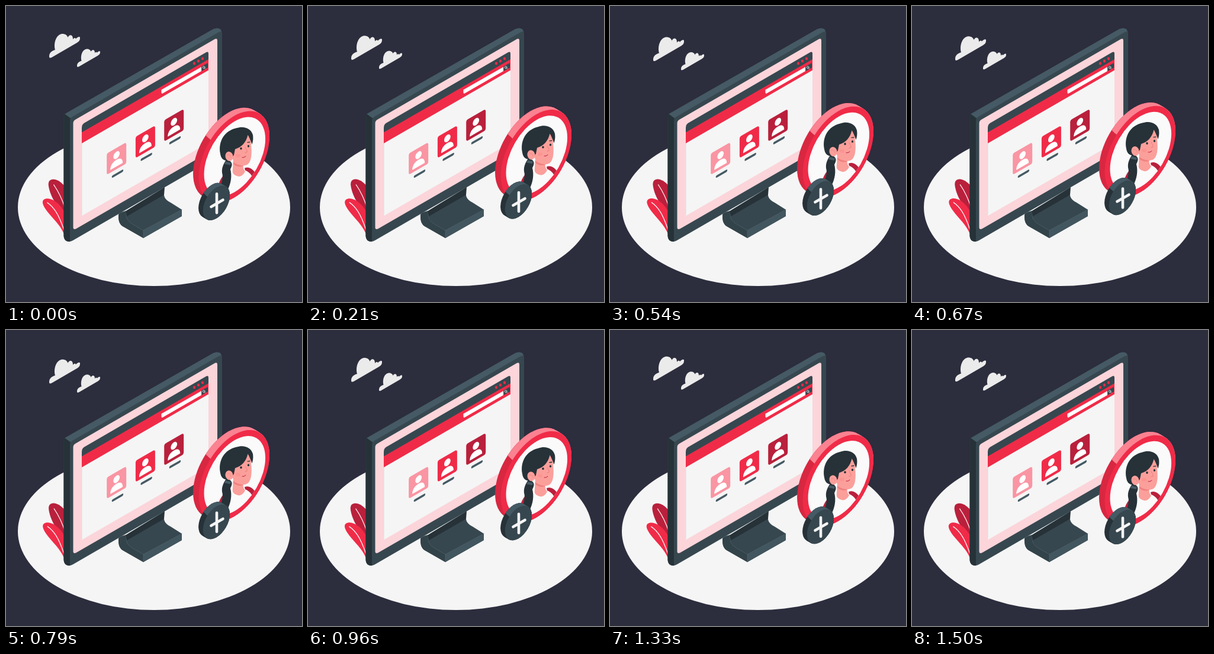
Animation of 500 by 500 pixels, one loop 1.54 s. Source, as an HTML page with a canvas:

```html
<!DOCTYPE html>
<html lang="en">
<head>
<meta charset="utf-8">
<title>Add a contact</title>
<style>
html, body { margin: 0; width: 100%; height: 100%; overflow: hidden; background: #2c2d3d; }
canvas { display: block; width: 100vw; height: 100vh; }
</style>
</head>
<body>
<canvas id="stage" width="500" height="500"></canvas>
<script>
const ctx = document.getElementById('stage').getContext('2d');
const LOOP = 1540;
const ISO = -0.577;
const RED = '#f02b48', DEEP_RED = '#b9203c', PINK = '#fa8291', PALE_PINK = '#fa95a3';
const INK = '#263238', SLATE = '#37474f', STEEL = '#455a64';
const PAPER = '#f5f5f5', SKIN = '#fb9f9b';

function fill(path, color) {
  ctx.fillStyle = color;
  ctx.fill(new Path2D(path));
}

function line(path, color, width) {
  ctx.strokeStyle = color;
  ctx.lineWidth = width;
  ctx.lineCap = ctx.lineJoin = 'round';
  ctx.stroke(new Path2D(path));
}

function dot(x, y, rx, color, ry = rx, angle = 0) {
  ctx.fillStyle = color;
  ctx.beginPath();
  ctx.ellipse(x, y, rx, ry, angle, 0, 7);
  ctx.fill();
}

function at(x, y, draw) {
  ctx.save();
  ctx.translate(x, y);
  draw();
  ctx.restore();
}

// Cosine wave between -1 and 1, highest at the given time.
const wave = (t, peak) => Math.cos((t - peak) / LOOP * 2 * Math.PI);

function cloud(x, y, scale) {
  at(x, y, () => {
    ctx.scale(scale, scale);
    fill('M0 -2C0 -8 4 -11 10 -13C7 -25 12 -39 22 -40C27 -40 30 -38 31.5 -34C33 -38 37 -39 39 -36C40 -34 40 -32 40 -30.5C41 -33 44 -34 45 -31.5C48 -35 53 -37 52 -32C52 -29 50 -27 47 -25L4 0C1 1 0 1 0 -2Z', '#ebebeb');
  });
}

function leaves(t) {
  at(100, 390, () => {
    ctx.rotate(wave(t, 500) * 0.006);
    ctx.translate(-100, -390);
    fill('M110 360C93 349 75 326 72 303C71 294 77 291 85 293.5C96 297 105 311 112 324Z', DEEP_RED);
    line('M81 302C90 315 95 326 100 342', '#fbdfe3', 1.4);
    fill('M100 390C94 373 84 364 73 351C64 340 59 331 64 327C71 322 84 328 92 338C99 347 102 355 106 364Z', RED);
    line('M70 332C83 341 90 355 98 378', '#fdeaed', 1.4);
  });
}

function stand() {
  fill('M190 353C190 350 196 348 203 346L267 307C265 323 269 327 278 332L297 344V355L232 392L197 372C191 368 190 362 190 353Z', SLATE);
  fill('M190 353C190 350 196 348 203 346C201 357 205 362 212 367L232 379V392L197 372C191 368 190 362 190 353Z', '#33434a');
  fill('M232 379L297 344V355L232 392Z', '#42565f');
  fill('M203 346L268 306L267 319L203 356Z', INK);
  line('M203 352C203 360 207 364 213 368L232 379L297 344M232 379V391', '#51646d', 0.7);
}

function card(x, y, color) {
  ctx.save();
  ctx.transform(1, ISO, 0, 1, x, y);
  ctx.fillStyle = color;
  ctx.beginPath();
  ctx.roundRect(0, 0, 33, 36, 3.3);
  ctx.fill();
  dot(16.5, 12.2, 5.4, '#fff', 6);
  fill('M6 31.3C6 24 10 20 16.5 20S27 24 27 31.3Z', '#fff');
  line('M10.5 44.5H26', STEEL, 4);
  ctx.restore();
}

function monitor() {
  fill('M97.5 187Q97.5 183 101 181L350 39Q357 36 362 39Q365 42 365 47V244Q365 250 360 253L113 396Q106 400 101 396Q97.5 393 97.5 388Z', SLATE);
  fill('M97.5 187Q97.5 184 99.5 182.5L109 189Q108 191 108 196V398Q97.5 398 97.5 388Z', INK);
  fill('M99.5 182.5L350 39Q357 36 362 39L364 43Q361 43 356 46L113 186.5L109 189.5Z', STEEL);
  fill('M113.5 198Q113.5 194 117 192L353 55.8Q357 54 357 58V236Q357 240 353 241L118 376.5Q113.5 378 113.5 374Z', '#fbd5da');

  fill('M128 212L342 91V231L128 354.5Z', PAPER);
  line('M128.3 230V353', '#dedede', 0.7);
  fill('M128 214V206Q128 200 132 197.7L338 78.2Q342 76 342 80V92Z', SLATE);
  fill('M128 213.5L342 90V108.5L128 232Z', RED);
  for (const [x, y] of [[318, 97], [325, 93], [332, 89]]) dot(x, y, 2.1, RED, 2.4);
  fill('M262.5 141.5L330 103V110L264 148Q262.5 148 262.5 146Z', '#fff');
  fill('M330.5 102L340 96.5Q341 97 341 99V104L330.5 110Z', SLATE);
  ctx.strokeStyle = '#fff';
  ctx.lineWidth = 0.8;
  ctx.beginPath();
  ctx.arc(334.2, 103.6, 1.8, 0, 7);
  ctx.moveTo(335.5, 105);
  ctx.lineTo(336.6, 106);
  ctx.stroke();

  card(170.2, 249.2, PALE_PINK);
  card(218.9, 220.9, RED);
  card(267.2, 192.9, DEEP_RED);
}

function isoCircle(x, y, r, color) {
  ctx.save();
  ctx.transform(0.866, -0.5, 0, 1, x, y);
  dot(0, 0, r, color);
  ctx.restore();
}

// A thick coin whose rim shows toward the upper left, lit on top.
function coin(x, y, r, depth, face, side, light) {
  const rim = color => {
    for (let i = 0; i <= 12; i++) isoCircle(x - depth * i / 12, y - depth * 0.6 * i / 12, r, color);
  };
  rim(side);
  ctx.save();
  ctx.beginPath();
  for (const [u, v] of [[-0.84, -0.65], [-0.55, -0.4], [1, -0.4], [1, -1.4], [-0.84, -1.4]]) {
    ctx.lineTo(x + u * r, y + v * r);
  }
  ctx.clip();
  rim(light);
  ctx.restore();
  isoCircle(x, y, r, face);
}

function portrait() {
  // shoulders and neck
  fill('M357 309C360 296 364 288 371 284L378 296L374 312Z', DEEP_RED);
  fill('M403 274C410 271 416 275 421 282L417 291C414 284 410 280 404 278Z', DEEP_RED);
  fill('M384 257L401 266C400 273 401 276 404 280C400 287 395 290 389 287C384 285 382 282 383 277Z', SKIN);
  fill('M384 264C389 268 395 270 401 269L400 271C393 273 387 270 384 267Z', '#ef817f');
  // face
  fill('M381 235L408 215C413 219 414 228 414 235C415 243 415 249 414 256C412 267 407 270 400 270C391 269 384 263 381 255Z', SKIN);
  // hair
  fill('M374 261C367 262 363 257 362 250C358 229 369 211 389 206.5C402 202 414 207 417 218C418 225 417 230 415.5 234C413 227 411 222 408.5 218C406 230 398 239 387 242L385 252L379 260Z', INK);
  fill('M372 260C382 262 384 267 379 276C382 288 380 300 374 312L364 308C362 298 368 292 365 282C364 273 368 266 372 260Z', INK);
  fill('M371 263L380 265L379 269L369 267Z', STEEL);
  dot(377, 254, 6.5, SKIN, 8, -0.2);
  line('M374 252C377 250 380 253 380 256', '#e98582', 0.8);
  // features
  dot(392, 253, 4, '#fa9592', 3);
  dot(397, 241, 1.7, INK, 2);
  dot(409.5, 237, 1.6, INK, 2);
  line('M393 236.5Q395 233.5 398 234.5M408 230.5L412 230', INK, 1.3);
  line('M404 239C406 243 408 245 407 247L404 248', '#e77976', 0.9);
  line('M399 256Q402 257 405 254', DEEP_RED, 1);
}

function badge() {
  coin(385.3, 254.8, 69, 9.5, RED, '#d82741', PINK);
  isoCircle(386.3, 254.6, 59.8, '#fafafa');
  ctx.save();
  ctx.beginPath();
  ctx.save();
  ctx.transform(0.866, -0.5, 0, 1, 386.3, 254.6);
  ctx.arc(0, 0, 59.8, 0, 7);
  ctx.restore();
  ctx.clip();
  portrait();
  ctx.restore();
  coin(355.4, 332.8, 26.2, 7.6, SLATE, INK, STEEL);
  line('M356 317.5V349.5M346.5 339.3L366.5 327.7', PAPER, 4.6);
}

function render(now) {
  const t = now % LOOP;
  ctx.fillStyle = '#2c2d3d';
  ctx.fillRect(0, 0, 500, 500);
  dot(250, 340, 230, PAPER, 133);

  at(0, 1 + 4 * wave(t, 480), () => {
    cloud(73, 87.5, 1);
    cloud(120, 103, 0.75);
  });
  leaves(t);
  stand();
  monitor();
  at(0, -4.5 - 4.5 * wave(t, 705), badge);
}

const start = performance.now();
function tick() {
  render(performance.now() - start);
  requestAnimationFrame(tick);
}
tick();
</script>
</body>
</html>
```
